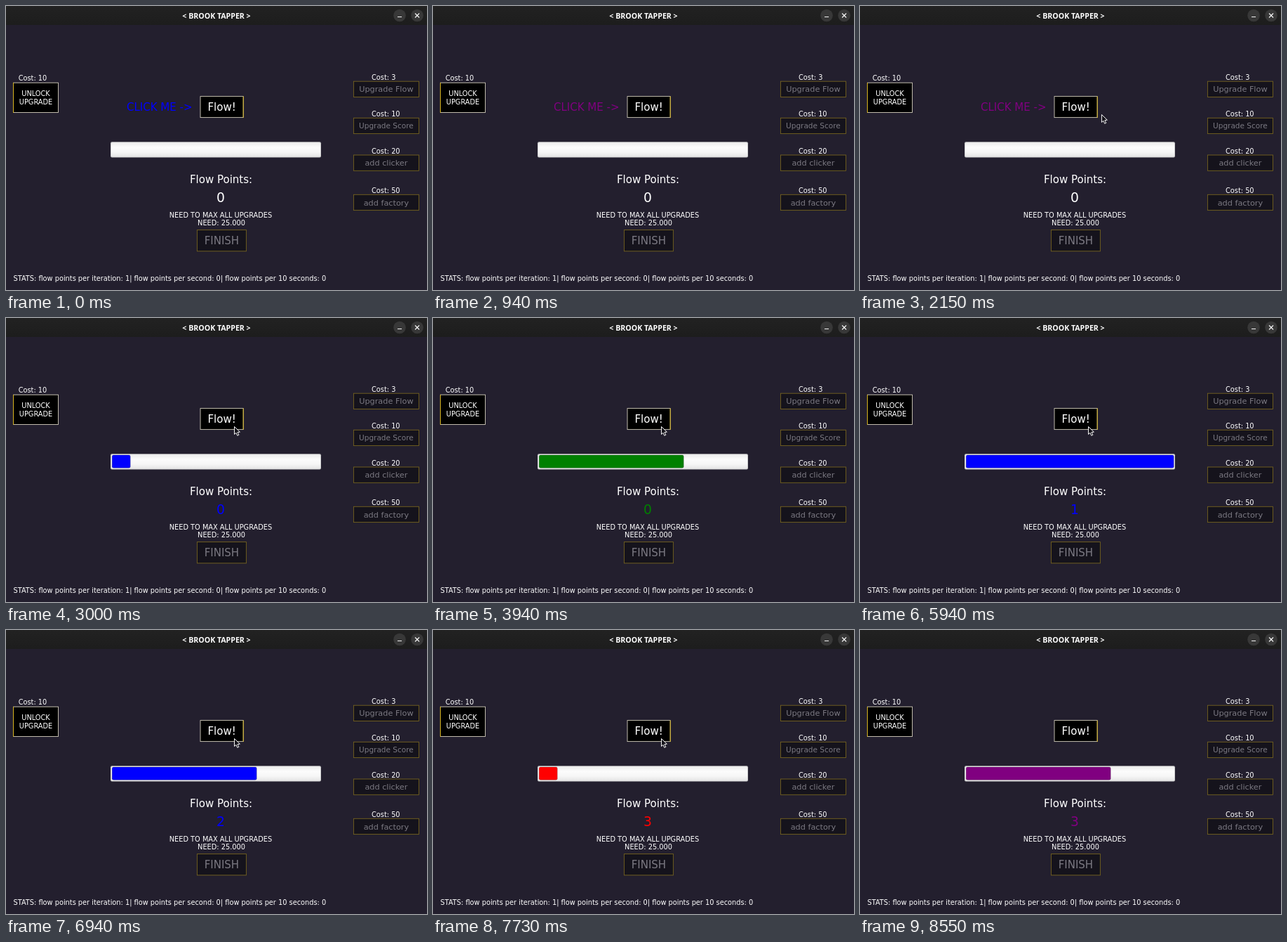
Animation, 600 px wide and 404 px high, one loop 9880 ms. Source, as an HTML page with a canvas:

```html
<!DOCTYPE html>
<html lang="en">
<head>
<meta charset="utf-8">
<title>Brook Tapper</title>
<style>
html, body { margin: 0; width: 100%; height: 100%; overflow: hidden; background: #231f2e; }
canvas { display: block; width: 600px; height: 404px; }
</style>
</head>
<body>
<canvas id="stage" width="600" height="404"></canvas>
<script>
const ctx = document.getElementById('stage').getContext('2d');
const LOOP = 9880;
const CLICK = 2760;
const HINT_STEP = 300;
const TICKS_PER_POINT = 11;
const COLORS = ['#800080', '#0000ff', '#ff0000', '#008000'];
const SMALL = 9.79;
const PLAIN = '"DejaVu Sans", sans-serif';
const TITLE = '"Open Sans", "Noto Sans", sans-serif';

// [time, tick]: the bar starts slowly, then settles to an even pace
const pace = [[CLICK, 0], [3240, 2], [3940, 7], [5180, 15], [5940, 21], [6940, 29], [8420, 40], [LOOP, 40]];
// [time, x, y] of the pointer tip
const pointerPath = [
  [1450, 508, 398], [1850, 418, 226], [2150, 344, 154],
  [2420, 325, 154], [8390, 325, 154], [8550, 432, 89]
];

// Linear interpolation through key points; null outside their time span
function along(keys, t) {
  const i = keys.findIndex(k => k[0] > t);
  if (i < 1) return null;
  const [a, b] = [keys[i - 1], keys[i]];
  const k = (t - a[0]) / (b[0] - a[0]);
  return a.slice(1).map((v, j) => v + (b[j + 1] - v) * k);
}

function text(str, x, y, size, color = '#fff', align = 'center', font = PLAIN, weight = '') {
  ctx.font = `${weight} ${size}px ${font}`;
  ctx.fillStyle = color;
  ctx.textAlign = align;
  ctx.fillText(str, x, y);
}

function line(color, width, ...pts) {
  ctx.strokeStyle = color;
  ctx.lineWidth = width;
  ctx.beginPath();
  pts.forEach(([x, y]) => ctx.lineTo(x, y));
  ctx.stroke();
}

function roundBox(x, y, w, h, r, fill) {
  ctx.fillStyle = fill;
  ctx.beginPath();
  ctx.roundRect(x, y, w, h, r);
  ctx.fill();
}

function shade(x1, y0, y1, ...stops) {
  const g = ctx.createLinearGradient(0, y0, x1, y1);
  stops.forEach((c, i) => g.addColorStop(i / (stops.length - 1), c));
  return g;
}

// x, y, w, h run along the middle of the border line
function button(lines, x, y, w, h, size, active) {
  ctx.fillStyle = active ? '#000' : '#15131c';
  ctx.fillRect(x, y, w, h);
  ctx.strokeStyle = active ? '#d2cdbb' : '#75631f';
  ctx.lineWidth = 0.9;
  ctx.strokeRect(x, y, w, h);
  const first = y + h / 2 + size * 0.36 - (lines.length - 1) * size * 0.61;
  lines.forEach((s, i) => text(s, x + w / 2, first + i * size * 1.22, size, active ? '#fff' : '#7b7982'));
}

function titleBar() {
  ctx.fillStyle = shade(0, 0, 27, '#222222', '#1d1d1d');
  ctx.fillRect(0, 0, 600, 27);
  text('< BROOK TAPPER >', 300, 18, 10.6, '#fff', 'center', TITLE, 'bold');
  for (const x of [561, 586]) roundBox(x - 8.8, 4.7, 17.6, 17.6, 8.8, '#383838');
  line('#f2f2f2', 1, [558, 15.5], [564, 15.5]);
  line('#f2f2f2', 1.2, [583, 10.5], [589, 16.5]);
  line('#f2f2f2', 1.2, [589, 10.5], [583, 16.5]);
}

function shop() {
  text('Cost: 10', 38, 105.5, SMALL);
  button(['UNLOCK', 'UPGRADE'], 10.5, 109.2, 64, 42.3, SMALL, true);
  line('#d8b520', 1, [10.5, 109], [10.5, 152]);

  const items = [
    ['Upgrade Flow', 3, 107.2, 11.25],
    ['Upgrade Score', 10, 159.3, 10.5],
    ['add clicker', 20, 212, 11.25],
    ['add factory', 50, 268.3, 11.25]
  ];
  for (const [label, cost, y, size] of items) {
    text('Cost: ' + cost, 521, y - 2, SMALL, '#fff', 'left');
    button([label], 495.4, y, 93, 22.3, size, false);
  }
}

function progress(part, color) {
  roundBox(149, 193.2, 300, 22.4, 2, '#c2c2c4');
  roundBox(149.8, 194, 298.4, 20.8, 2, shade(0, 194, 215, '#ebebeb', '#fcfcfc', '#f6f6f6', '#e4e4e4'));
  if (part === 0) return;
  const w = 300 * part - 4;
  roundBox(151.2, 195, w, 18.2, 2, color);
  ctx.strokeStyle = 'rgba(0,0,0,0.25)';
  ctx.lineWidth = 0.8;
  ctx.stroke();
}

function pointer(x, y) {
  ctx.save();
  ctx.translate(x, y);
  ctx.beginPath();
  for (const [px, py] of [[0.5, 0.5], [0.5, 11.5], [3, 9.3], [4.8, 13.3], [6.8, 12.4], [5, 8.5], [8.4, 8.2]]) {
    ctx.lineTo(px, py);
  }
  ctx.closePath();
  ctx.fillStyle = '#16141c';
  ctx.fill();
  ctx.strokeStyle = '#f4f4f4';
  ctx.lineWidth = 1;
  ctx.lineJoin = 'round';
  ctx.stroke();
  ctx.restore();
}

function draw(t) {
  ctx.fillStyle = '#231f2e';
  ctx.fillRect(0, 0, 600, 404);
  titleBar();
  shop();

  if (t < CLICK) {
    const step = Math.floor((t + 30) / HINT_STEP);
    text('CLICK ME ->', 172, 149, 15, COLORS[(step + 1) % 4], 'left');
  }
  button(['Flow!'], 277, 128.6, 61.2, 30, 15, true);
  line('#d8b520', 1, [338.2, 128.5], [338.2, 159]);

  const at = along(pace, t);
  const tick = at ? Math.floor(at[0] + 1e-6) : 0;
  const color = at ? COLORS[tick % 4] : '#fff';
  progress(tick % TICKS_PER_POINT / 10, color);

  text('Flow Points:', 306.5, 252, 15);
  text(String(Math.floor(tick / TICKS_PER_POINT)), 306, 279, 18.75, color);
  text('NEED TO MAX ALL UPGRADES', 306, 300.5, SMALL);
  text('NEED: 25.000', 307, 312.4, SMALL);
  button(['FINISH'], 272.4, 318.6, 70, 30.2, 15, false);
  text('STATS: flow points per iteration: 1| flow points per second: 0| flow points per 10 seconds: 0',
    10.5, 390.5, SMALL, '#fff', 'left');

  const tip = along(pointerPath, t);
  if (tip) pointer(...tip);
}

const start = performance.now();
function frame() {
  draw((performance.now() - start) % LOOP);
  requestAnimationFrame(frame);
}
frame();
</script>
</body>
</html>
```
